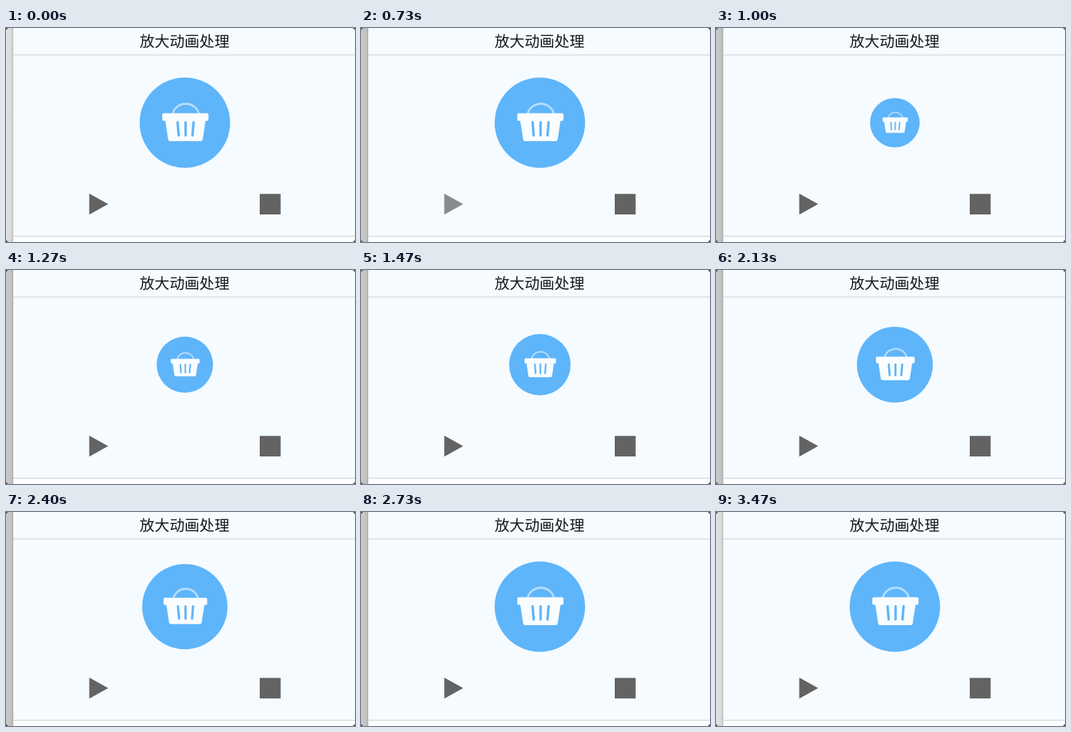
These frames come from a looping animation (480x295 px, 3.59 s). An HTML page with a canvas:

```html
<!DOCTYPE html>
<html lang="zh-CN">
<head>
<meta charset="utf-8">
<style>
html, body { margin: 0; height: 100%; overflow: hidden; background: #f5fbff; }
canvas { display: block; }
</style>
</head>
<body>
<canvas id="stage" width="480" height="295"></canvas>
<script>
const ctx = document.getElementById('stage').getContext('2d');
const LOOP = 3590, STEP = 1000 / 15;
const BLUE = '#5eb5fa', GREY = '#636363', WHITE = '#fafdff';
const PRESS = 600, GROW = 800, STRIP_END = 3470;

// Time and radius of the growing badge
const GROWTH = [[800, 31], [1000, 34], [1467, 42.2], [2133, 52], [2400, 58.5], [2667, 62]];

function radius(t) {
  if (t < GROW - 1) return 62;
  for (let i = 1; i < GROWTH.length; i++) {
    const [t0, r0] = GROWTH[i - 1], [t1, r1] = GROWTH[i];
    if (t < t1) return r0 + (r1 - r0) * (t - t0) / (t1 - t0);
  }
  return 62;
}

function rect(x, y, w, h, color) {
  ctx.fillStyle = color;
  ctx.fillRect(x, y, w, h);
}

function poly(points, color) {
  ctx.fillStyle = color;
  ctx.beginPath();
  points.forEach(([x, y]) => ctx.lineTo(x, y));
  ctx.closePath();
  ctx.fill();
}

function line(x0, y0, x1, y1, width, color) {
  ctx.strokeStyle = color;
  ctx.lineWidth = width;
  ctx.lineCap = 'round';
  ctx.beginPath();
  ctx.moveTo(x0, y0);
  ctx.lineTo(x1, y1);
  ctx.stroke();
}

function drawPage(dark) {
  rect(0, 0, 480, 295, '#f5fbff');
  rect(10, 36.5, 470, 1.3, '#d5d9dc');
  rect(10, 286.5, 470, 1.3, '#d5d9dc');
  rect(10, 288, 470, 7, '#fcfeff');

  const shade = ctx.createLinearGradient(0, 0, 10, 0);
  shade.addColorStop(0, dark ? '#c9c9c9' : '#e2e2e2');
  shade.addColorStop(0.7, dark ? '#c2c2c2' : '#dadada');
  shade.addColorStop(1, dark ? '#aeaeae' : '#bdbdbd');
  rect(0, 0, 10, 295, shade);

  for (const [x, sx] of [[0, 1], [480, -1]])
    for (const [y, sy] of [[0, 1], [295, -1]])
      poly([[x, y], [x + 3 * sx, y], [x, y + 3 * sy]], '#55585a');

  ctx.fillStyle = '#16181a';
  ctx.font = '20.6px "Noto Sans CJK SC", "Noto Sans CJK", sans-serif';
  ctx.textAlign = 'center';
  ctx.fillText('放大动画处理', 245.5, 26);
}

function drawBadge(r) {
  ctx.save();
  ctx.translate(246, 130.5);
  ctx.scale(r / 62, r / 62);

  ctx.fillStyle = BLUE;
  ctx.beginPath();
  ctx.arc(0, 0, 62.2, 0, 2 * Math.PI);
  ctx.fill();

  ctx.strokeStyle = '#b5dcfc';
  ctx.lineWidth = 3;
  ctx.beginPath();
  ctx.ellipse(1.3, -9, 18.3, 17, 0, Math.PI, 2 * Math.PI);
  ctx.stroke();

  ctx.fillStyle = WHITE;
  ctx.beginPath();
  ctx.roundRect(-31, -13, 63.5, 10.5, 2);
  ctx.fill();
  ctx.beginPath();
  ctx.moveTo(-27, -3);
  ctx.lineTo(28.5, -3);
  ctx.lineTo(24.5, 23);
  ctx.quadraticCurveTo(24, 25.5, 21.5, 25.5);
  ctx.lineTo(-20, 25.5);
  ctx.quadraticCurveTo(-22.5, 25.5, -23, 23);
  ctx.fill();

  line(-10, -0.5, -8.5, 17.5, 3.4, BLUE);
  line(1, -0.5, 1, 17.5, 3.4, BLUE);
  line(12, -0.5, 10.5, 17.5, 3.4, BLUE);
  ctx.restore();
}

function draw(now) {
  // The picture advances at 15 steps per second
  const t = Math.floor((now % LOOP + 4) / STEP) * STEP;
  drawPage(t >= PRESS - 1 && t < STRIP_END - 5);
  drawBadge(radius(t));
  const pressed = t >= PRESS - 1 && t < GROW - 1;
  poly([[114.5, 228.3], [140.5, 242.8], [114.5, 257.3]], pressed ? '#888a8b' : GREY);
  rect(349, 228.7, 28.7, 28.3, GREY);
}

let start;
function tick(now) {
  start ??= now;
  draw(now - start);
  requestAnimationFrame(tick);
}
draw(0);
requestAnimationFrame(tick);
</script>
</body>
</html>
```
